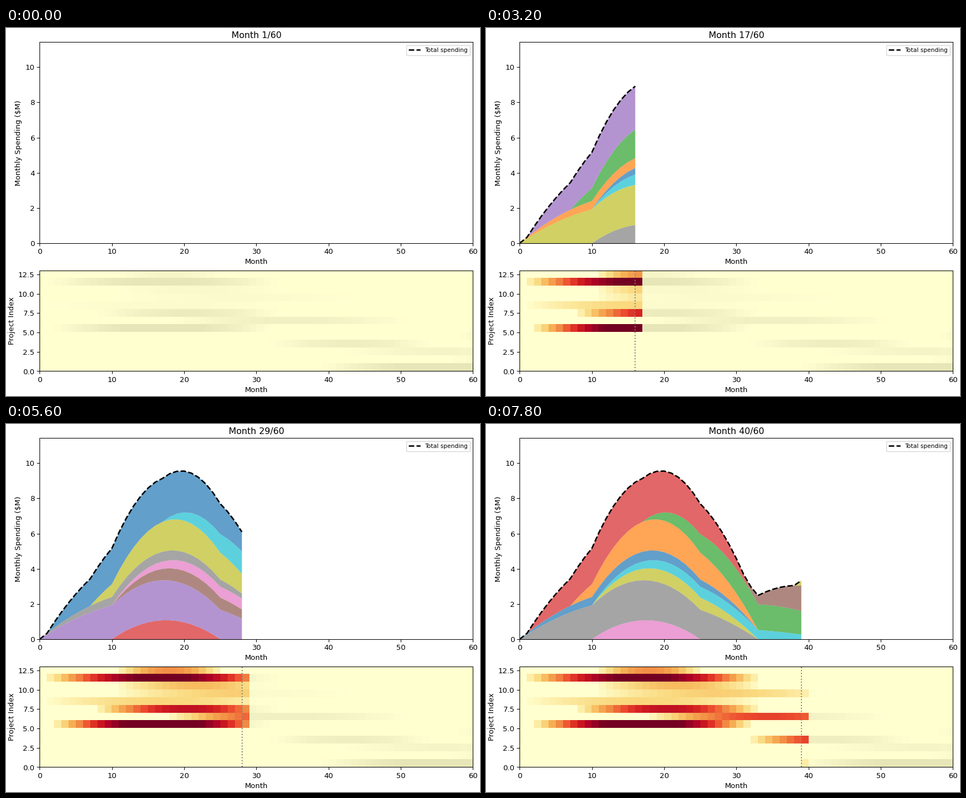
These frames come from a looping animation (849 by 660 pixels, 8 s). A matplotlib script:

```python
import numpy as np
import matplotlib.pyplot as plt
from matplotlib.animation import FuncAnimation

W, H, DPI = 849, 660, 94.3
MONTHS = 60
SHOWN = 40
PEAK_COLOR = 2.2

# start month, end month, peak spending; row 0 first
PROJECTS = [
    (38, 71, 2.4), (56, 86, 1.5), (41, 70, 1.1), (31, 54, 1.6),
    (57, 87, 2.0), (1, 32, 2.47), (17, 51, 1.46), (7, 33, 1.79),
    (0, 33, 0.56), (10, 43, 0.62), (10, 33, 0.765), (0, 33, 2.28),
    (10, 25, 1.08),
]

months = np.arange(MONTHS)


def spending(start, end, peak):
    """Parabolic spending profile over the life of one project."""
    t = (months - start) / (end - start)
    return np.maximum(4 * peak * t * (1 - t), 0)


spend = np.array([spending(*p) for p in PROJECTS])
stacked = spend[::-1]
total = spend.sum(axis=0)
rows = len(spend)


def add_axes(left, top, right, bottom):
    return fig.add_axes([left / W, 1 - bottom / H,
                         (right - left) / W, (bottom - top) / H])


# the small margin keeps the pixel size from being rounded down
fig = plt.figure(figsize=((W + 0.01) / DPI, (H + 0.01) / DPI), dpi=DPI,
                 facecolor="white")

ax = add_axes(60.4, 25.5, 836.4, 386)
ax.set(xlim=(0, MONTHS), ylim=(0, 11.42),
       xlabel="Month", ylabel="Monthly Spending ($M)")
total_line, = ax.plot([], [], "k--", lw=2, label="Total spending")
ax.legend(loc="upper right", fontsize=8)
title = ax.set_title("")

heat_ax = add_axes(60.4, 435, 836.4, 615.5)
grid = dict(aspect="auto", origin="lower", extent=(0, MONTHS, 0, rows),
            interpolation="nearest", vmin=0, vmax=PEAK_COLOR)
heat = heat_ax.imshow(np.zeros_like(spend), cmap="YlOrRd", **grid)
heat_ax.imshow(spend, cmap="Greys", alpha=0.1, **grid)
cursor = heat_ax.axvline(0, color="gray", ls=":", lw=1.5)
heat_ax.set(xlim=(0, MONTHS), ylim=(0, rows),
            xlabel="Month", ylabel="Project Index")

areas = []


def update(month):
    n = month + 1
    while areas:
        areas.pop().remove()
    # the colour cycle runs on from month to month
    first = month * rows - 1
    colors = [f"C{(first + i) % 10}" for i in range(rows)]
    areas.extend(ax.stackplot(months[:n], stacked[:, :n],
                              colors=colors, alpha=0.7))
    total_line.set_data(months[:n], total[:n])
    title.set_text(f"Month {n}/{MONTHS}")
    heat.set_data(np.where(months <= month, spend, 0))
    cursor.set_xdata([month, month])
    return [total_line, title, heat, cursor, *areas]


anim = FuncAnimation(fig, update, frames=SHOWN, interval=200,
                     init_func=lambda: update(0), repeat=True,
                     repeat_delay=0, blit=False)
plt.show()
```
